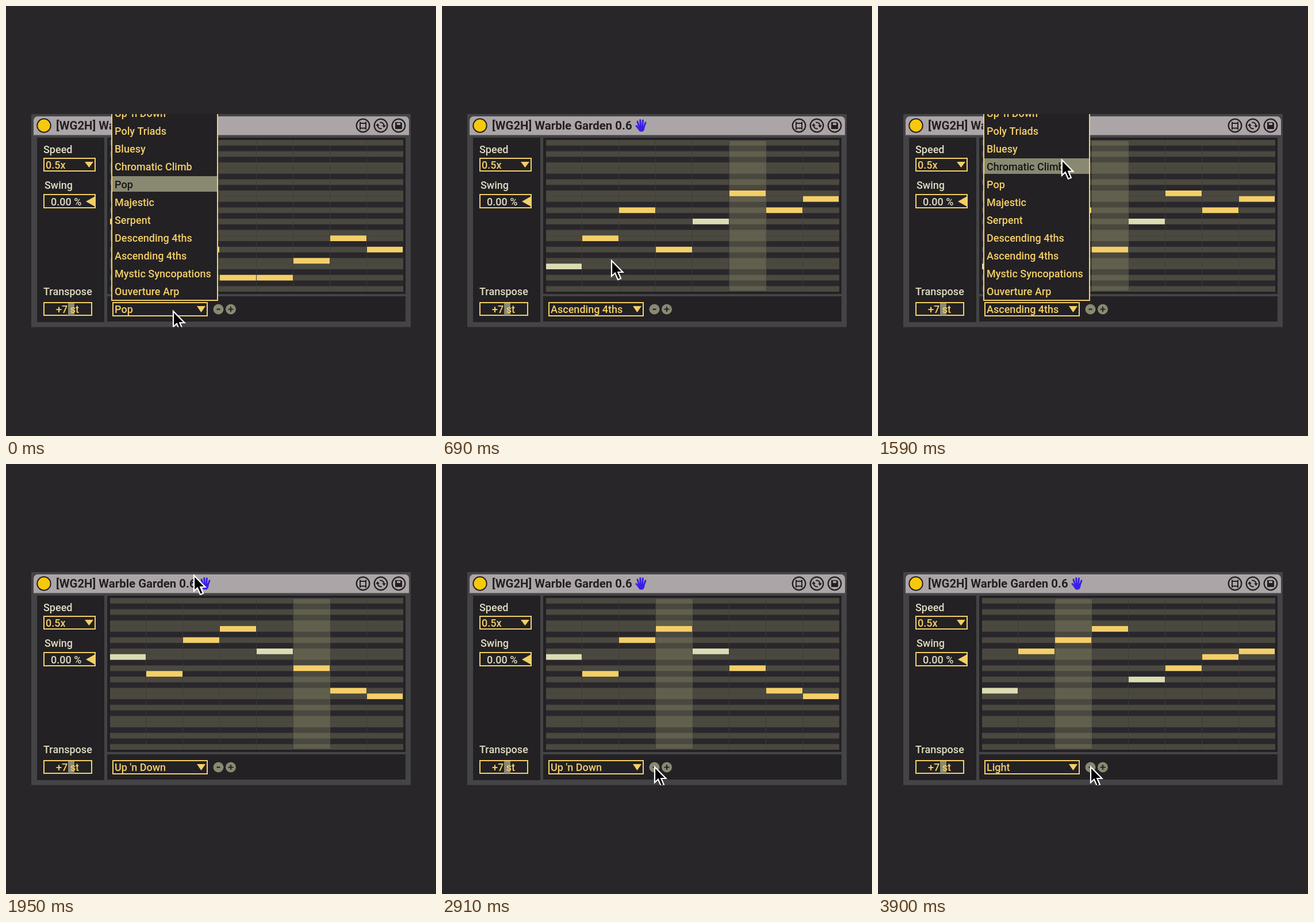
Write an HTML page with a canvas that moves like this. It is 748x748 px and loops after 3.93 s.

```html
<!DOCTYPE html>
<html lang="en">
<head>
<meta charset="utf-8">
<style>
  html, body { margin: 0; width: 100%; height: 100%; overflow: hidden; background: #282629; }
  canvas { display: block; width: 748px; height: 748px; }
</style>
</head>
<body>
<canvas id="stage" width="748" height="748"></canvas>
<script>
const ctx = document.getElementById('stage').getContext('2d');
const LOOP = 3930, STEP = 155, ROW = 9.78;
const BACK = '#282629', FRAME = '#444446', PANEL = '#232124', BAR = '#aca5a8';
const YELLOW = '#f4cf68', PALE = '#dcdcb4', LABEL = '#e0dcc2', OLIVE = '#898972', INK = '#231f20';
const FONT = 'Roboto, sans-serif';

const items = ["Up 'n Down", 'Poly Triads', 'Bluesy', 'Chromatic Climb', 'Pop', 'Majestic', 'Serpent',
  'Descending 4ths', 'Ascending 4ths', 'Mystic Syncopations', 'Ouverture Arp'];
const patterns = [
  { at: 0, name: 'Pop', rows: [14, 17, 19, 24, 24, 21, 17, 19], flat: true },
  { at: 600, name: 'Ascending 4ths', rows: [22, 17, 12, 19, 14, 9, 12, 10] },
  { at: 1850, name: "Up 'n Down", rows: [10, 13, 7, 5, 9, 12, 16, 17] },
  { at: 2980, name: 'Stairs', rows: [7, 10, 9, 13, 12, 10, 16, 17] },
  { at: 3600, name: 'Light', rows: [16, 9, 7, 5, 14, 12, 10, 9] }
];
const lightKeys = [0, 2, 4, 5, 7, 9, 10];
const menuOpen = t => t < 600 || (t >= 1110 && t < 1850);

// time, x, y of the pointer tip
const path = [[0, 290, 529], [100, 290, 529], [530, 294, 441], [750, 294, 441], [1060, 293, 533], [1220, 293, 533],
  [1750, 326, 192], [2000, 326, 192], [2500, 369, 533], [2680, 369, 533], [2860, 369, 525], [LOOP, 369, 525]];

function pointerAt(t) {
  const i = path.findIndex(k => k[0] > t), a = path[i - 1], b = path[i];
  const u = (t - a[0]) / (b[0] - a[0]), e = u * u * (3 - 2 * u);
  return [a[1] + (b[1] - a[1]) * e, a[2] + (b[2] - a[2]) * e];
}

function box(x0, y0, x1, y1, fill) {
  ctx.fillStyle = fill;
  ctx.fillRect(x0, y0, x1 - x0, y1 - y0);
}
function outline(x0, y0, x1, y1) {
  ctx.strokeStyle = YELLOW;
  ctx.lineWidth = 2;
  ctx.strokeRect(x0 + 1, y0 + 1, x1 - x0 - 2, y1 - y0 - 2);
}
function text(str, x, mid, fill, font = '500 18px ') {
  ctx.font = font + FONT;
  ctx.fillStyle = fill;
  ctx.fillText(str, x, mid + 6.5);
}
function poly(fill, ...pts) {
  ctx.beginPath();
  pts.forEach(p => ctx.lineTo(...p));
  ctx.closePath();
  ctx.fillStyle = fill;
  ctx.fill();
}
function disc(x, y, r, fill, stroke, width = 2) {
  ctx.beginPath();
  ctx.arc(x, y, r, 0, 7);
  ctx.fillStyle = fill;
  ctx.fill();
  if (!stroke) return;
  ctx.strokeStyle = stroke;
  ctx.lineWidth = width;
  ctx.stroke();
}
function line(color, width, ...pts) {
  ctx.beginPath();
  pts.forEach(p => ctx.lineTo(...p));
  ctx.strokeStyle = color;
  ctx.lineWidth = width;
  ctx.stroke();
}

function hand() {
  const blue = '#3a20e2';
  ctx.lineCap = 'round';
  line(blue, 3, [343, 210], [340, 201]);
  line(blue, 3, [345.5, 209], [344.8, 198.5]);
  line(blue, 3, [348.5, 209], [349.5, 199]);
  line(blue, 3, [351, 211], [354, 203]);
  line(blue, 3, [343, 214], [338, 208.5]);
  ctx.lineCap = 'butt';
  poly(blue, [341, 208], [353, 208], [352, 215], [349.5, 218.5], [344, 218.5], [340.5, 214]);
}

function titleBar() {
  ctx.beginPath();
  ctx.roundRect(48, 192, 653, 32.5, [7, 7, 0, 0]);
  ctx.fillStyle = BAR;
  ctx.fill();
  disc(66, 208, 11.7, '#f7c90c', INK, 2);
  text('[WG2H] Warble Garden 0.6', 87, 208.5, INK, '700 20.4px ');
  hand();
  for (const x of [621, 652, 683]) disc(x, 208, 11.3, BAR, INK, 2.3);

  ctx.lineWidth = 2;
  ctx.strokeRect(616, 204, 10, 8.5);
  for (const x of [616, 626]) {
    line(INK, 2, [x, 201.5], [x, 204]);
    line(INK, 2, [x, 212], [x, 215]);
  }
  for (const turn of [0, Math.PI]) {
    ctx.save();
    ctx.translate(652, 208);
    ctx.rotate(turn);
    ctx.beginPath();
    ctx.arc(0, 0, 5.5, -1.9, 0.1);
    ctx.strokeStyle = INK;
    ctx.lineWidth = 2;
    ctx.stroke();
    poly(INK, [2, -0.5], [9, -0.5], [5.5, 4]);
    ctx.restore();
  }
  poly(INK, [677, 202], [687, 202], [689, 204], [689, 214], [677, 214]);
  box(680, 203.5, 686, 207, BAR);
}

function sidePanel() {
  box(54, 229, 171, 550, PANEL);
  text('Speed', 65, 249.5, LABEL);
  outline(65, 264, 156, 288);
  text('0.5x', 69, 276.5, YELLOW);
  poly(YELLOW, [137, 271], [152, 271], [144.5, 281]);
  text('Swing', 67, 311.5, LABEL);
  outline(65, 327, 156, 352);
  text('0.00 %', 78, 340, LABEL);
  poly(YELLOW, [139, 340], [155, 331], [155, 349]);
  text('Transpose', 65, 496.5, LABEL);
  outline(65, 515, 150, 539);
  box(108, 517, 119, 538, OLIVE);
  text('+7 st', 87, 527.5, YELLOW);
}

function grid(t, pattern) {
  box(176, 229, 695, 501, PANEL);
  ctx.save();
  ctx.beginPath();
  ctx.rect(181, 233, 510, 264);
  ctx.clip();
  box(181, 233, 691, 497, '#29272b');
  for (let c = 1; c < 8; c++) box(179 + 64 * c, 233, 180 + 64 * c, 497, '#3d3b3b');
  for (let r = 0; r < 27; r++)
    if (lightKeys.includes(r % 12)) box(181, 233 + r * ROW, 691, 233 + (r + 1) * ROW, '#4a483f');
  for (let c = 1; c < 8; c++) box(179 + 64 * c, 233, 180 + 64 * c, 497, 'rgba(45,43,42,.3)');

  const now = Math.floor(t / STEP + 1.03) % 8;
  box(180 + 64 * now, 235, 244 + 64 * now, 495, 'rgba(150,150,110,.3)');
  pattern.rows.forEach((r, c) => {
    const y = 233 + r * ROW, x = 180 + 64 * c;
    box(x, y, Math.min(x + 63, 690), y + ROW, c % 4 || pattern.flat ? YELLOW : PALE);
  });
  ctx.restore();
}

function chooser(name) {
  box(176, 505, 695, 549, PANEL);
  outline(185, 515, 351, 540);
  text(name, 189, 527.5, YELLOW);
  poly(YELLOW, [332, 522], [347, 522], [339.5, 533]);
  for (const x of [369.5, 391]) disc(x, 527.5, 9, OLIVE);
  box(366.5, 526.5, 372.5, 528.7, PANEL);
  box(386.5, 526.5, 395.5, 528.5, PANEL);
  box(390, 523, 392, 532, PANEL);
}

function menu(selected, x, y) {
  box(183, 180, 369, 513, PANEL);
  const inside = x > 183 && x < 369 && y < 511;
  const active = inside ? Math.round((y - 185) / 31) : items.indexOf(selected);
  items.forEach((name, i) => {
    const mid = 185.5 + 31 * i;
    if (i === active) box(185, mid - 13.5, 367, mid + 13.5, OLIVE);
    text(name, 189, mid + 0.5, i === active ? '#171518' : YELLOW);
  });
  outline(183, 180, 369, 513);
}

function pointer(x, y) {
  ctx.save();
  ctx.translate(x, y);
  ctx.lineJoin = 'miter';
  poly('#000', [1, 2], [1, 29], [7, 23.5], [12, 35], [17, 33], [12.3, 22], [20.5, 22]);
  ctx.strokeStyle = '#fff';
  ctx.lineWidth = 2.2;
  ctx.stroke();
  ctx.restore();
}

function draw(t) {
  const pattern = patterns.findLast(p => p.at <= t);
  const [x, y] = pointerAt(t);
  box(0, 0, 748, 748, BACK);
  ctx.save();
  ctx.beginPath();
  ctx.rect(44, 188, 660, 370.5);
  ctx.clip();
  box(44, 188, 704, 559, FRAME);
  titleBar();
  sidePanel();
  grid(t, pattern);
  chooser(pattern.name);
  if (menuOpen(t)) menu(pattern.name, x, y);
  pointer(x, y);
  ctx.restore();
}

const start = performance.now();
function tick() {
  draw((performance.now() - start) % LOOP);
  requestAnimationFrame(tick);
}
tick();
</script>
</body>
</html>
```
